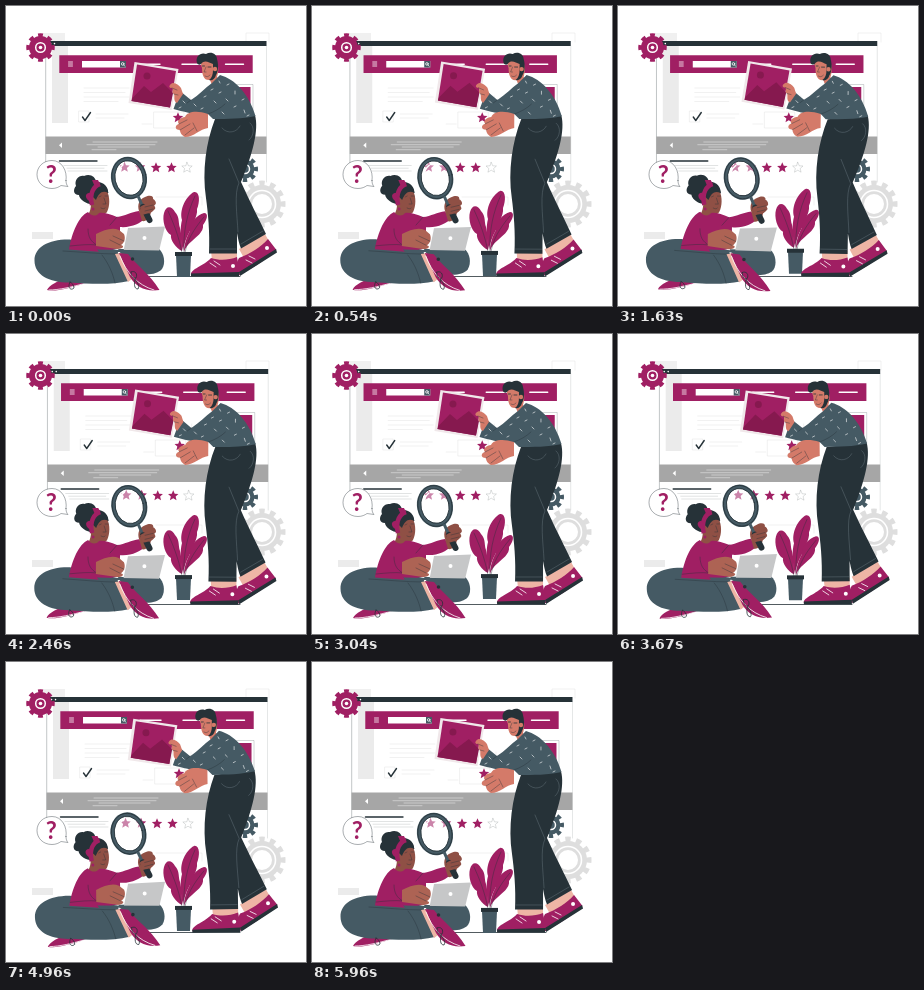
Write an HTML page that moves like this. It is 300x300 px and loops after 6000 ms.

```html
<!DOCTYPE html>
<html lang="en">
<head>
<meta charset="utf-8">
<title>Reviewing a page</title>
<style>
html, body { margin: 0; width: 100%; height: 100%; overflow: hidden; background: #fff }
svg { display: block; width: 100vw; height: 100vh }
.m { fill: #a01f63 } .d { fill: #263238 } .s { fill: #455a64 } .w { fill: #fff }
.g { fill: #ebebeb } .b { fill: #8f5045 } .lit { fill: #ad6354 } .k { fill: #d47a69 } .p { fill: #eeb5a5 }
.line { fill: none; stroke: #263238; stroke-width: .8; stroke-linecap: round; stroke-linejoin: round }
.thin { stroke-width: .4 }
.bold { stroke-width: 1.4 }
.white { stroke: #fff }
.pale { stroke: #dcdcdc }
</style>
</head>
<body>
<svg viewBox="0 0 300 300">
  <defs>
    <path id="star" d="M0-5.2 1.5-1.7 5.2-1.5 2.4 1 3.3 4.7 0 2.7-3.3 4.7-2.4 1-5.2-1.5-1.5-1.7Z"/>
  </defs>

  <!-- backdrop -->
  <g class="g">
    <path opacity=".75" d="M37 27H59V36H37Z"/>
    <path d="M26 226H47V233H26Z"/>
  </g>
  <path class="line thin pale" d="M240 35V27H263V36M150 191H196V199M222 226H248V233H222Z"/>

  <g id="page">
    <path class="w" d="M39.5 36H260.5V178H39.5Z"/>
    <path class="g" d="M46 40H62V117H46Z"/>
    <path class="line thin" d="M39.7 40V178" opacity=".7"/>
    <path class="line thin" d="M260.5 40V176" opacity=".3"/>
    <path class="d" d="M39.5 35H260.5V40H39.5Z"/>
    <g class="w"><circle cx="44.5" cy="37.6" r=".8"/><circle cx="48.5" cy="37.6" r=".8"/></g>
    <path class="m" d="M53.3 49.3H246.7V67H53.3Z"/>
    <path class="line white" d="M62.5 56H66.5M62.5 58H66.5M62.5 60H66.5"/>
    <path class="line bold white" d="M133 58.2H154M176 58.2H197M219.500 58.2H237.5"/>
    <path class="w" d="M76 55H120V61.5H76Z"/>
    <path class="s" d="M114 55H120V61.5H114Z"/>
    <circle class="line white" cx="116.7" cy="57.9" r="1.3"/>
    <path class="line white" d="M117.7 59 118.8 60.2"/>
    <path class="line thin pale" d="M78 82H123M78 86.5H119M78 91H123M78 95.5H112M90 108H122M90 112H118M73 105H83V116H73ZM148 106H178V122H148ZM184 90V122M136 118H146"/>
    <path class="line bold" d="M76.500 111 79 114.5 84.5 106.5"/>
    <path class="m" d="M229 81H244.5V108H229Z"/>
    <path class="line thin" d="M228 78.5H247V111" opacity=".5"/>

    <path fill="#a6a6a6" d="M39.500 130.5H260.500V148H39.5Z"/>
    <path class="w" d="M56 136.5V142L53 139.2Z"/>
    <path class="line thin white" d="M87 136H151M81 138.7H149M92 141H143M86 143.7H110"/>
    <path class="line bold" d="M53.5 155H91"/>
    <path class="line thin" opacity=".35" d="M58 159.5H101M61 162.2H98M62 165H101"/>
    <g class="m">
      <use href="#star" x="118.5" y="161"/><use href="#star" x="134" y="161"/>
      <use href="#star" x="150" y="161.5"/><use href="#star" x="165.5" y="161.5"/>
      <use href="#star" x="172" y="111.5"/>
    </g>
    <use href="#star" x="181" y="161.5" class="line thin" opacity=".4"/>
  </g>

  <!-- gears: dashed rings make the teeth -->
  <g fill="none">
    <circle cx="34.5" cy="41.5" r="11.5" stroke="#a01f63" stroke-width="5.5" pathLength="16" stroke-dasharray="1" stroke-dashoffset=".5"/>
    <circle class="m" cx="34.5" cy="41.5" r="11.5"/>
    <circle cx="34.5" cy="41.5" r="4.800" stroke="#fff" stroke-width="1.500"/>
    <circle class="w" cx="34.5" cy="41.5" r="1.8"/>
    <circle cx="256" cy="198" r="20.5" stroke="#dedede" stroke-width="6" pathLength="24" stroke-dasharray="1" stroke-dashoffset=".5"/>
    <circle cx="256" cy="198" r="14.5" stroke="#dedede" stroke-width="9"/>
    <circle cx="256" cy="198" r="13.5" stroke="#fff" stroke-width="1.6"/>
    <circle cx="239" cy="163" r="10.5" stroke="#455a64" stroke-width="5" pathLength="16" stroke-dasharray="1" stroke-dashoffset=".5"/>
    <circle class="s" cx="239" cy="163" r="9.5"/>
    <circle cx="239" cy="163" r="4.5" stroke="#fff" stroke-width="1.5"/>
  </g>

  <path class="line thin" style="fill:#fff" d="M60 174.5C61.5 165 56 154.5 46 154.5 37 154.5 31 161 31 168.5 31 176 37 182.5 46 182.5 50 182.5 53 181 55 179.5L62 180.5C60.5 179 60 177 60 174.5Z"/>
  <text class="m" x="45.3" y="177.3" text-anchor="middle" font-family="Lato, Inter, sans-serif" font-weight="700" font-size="24">?</text>
  <path class="line" d="M40 270.5H234"/>

  <g id="plant">
    <g class="m">
      <path d="M176 245C170 242 164 234 165 229 159 226 156 214 158 207 160 199 166 200 169 206 174 211 172 217 174 222 176 230 176 238 176 245Z"/>
      <path d="M177 245C174 232 174 222 176 214 173 204 180 190 188 186 194 185 194 196 191 203 192 211 185 219 184 225 180 232 178 238 177 245Z"/>
      <path d="M178 246C178 238 181 230 184 225 183 217 191 209 198 207 203 207 201 214 197 219 198 226 190 231 186 235 182 238 179 242 178 246Z"/>
    </g>
    <path class="line thin" d="M162 205C168 218 173 231 176 247M189 190C181 207 177 226 178 247M198 211C187 224 181 235 179 247"/>
    <path class="s" d="M170 249H185L184 271H171Z"/>
    <path class="d" d="M169 246H186V250H169Z"/>
  </g>

  <g id="woman">
    <path class="m" d="M62 271C52 275 43 279 41 284 48 286 62 283 86 275Z"/>
    <path class="line white" d="M43 284C53 284 66 281 80 277"/>
    <path class="s" d="M112 243H153C158 247 160 257 156 263 151 269 138 270 126 266Z"/>
    <path class="s" d="M64 233.5C43 233 28.5 241 28.5 254.5 28.5 269 43 276.5 63 276.5 86 278 106 279 123 275L111 244Z"/>
    <path class="line thin" d="M57 245C75 246 95 248 111 248M96 249C103 258 107 268 109 277"/>
    <path class="p" d="M109 248 115 247C119 255 124 264 126 273L122 276Z"/>
    <path class="m" d="M113 247 122 248C129 258 144 268 153.5 284 140 286 130 281 124 271Z"/>
    <path class="line white" d="M114 250C120 266 131 279 148 284"/>
    <circle class="d" cx="126.500" cy="253" r="1.8"/>
    <path class="line" d="M125 266C129 264 132 268 130 272 127 273 125 270 125 266M129 273C128 278 128 283 132 283 134 280 131 276 129 273M64 276C61 282 65 285 68 282 68 279 66 277 64 276"/>

    <path class="d" d="M84 198C78 197 73 192 73 189 67 189 67 183 70 180 68 174 73 169 78 170 84 167 90 171 90 176 97 175 103 181 102 187Z"/>
    <path class="b" d="M85 195C88 187 93 181 101 185 104 191 104 200 101 206 99 209 95 208 93 207L94 211C90 214 84 212 82 209 85 204 85 200 85 195Z"/>
    <path class="d" d="M86 190C88 176 100 175 102.500 187 96 184 93 187 90 194Z"/>
    <path fill="none" stroke="#a01f63" stroke-width="4.5" d="M94 178C88 180 83 187 86 199"/>
    <path class="m" d="M89 181 86 174 92 174 94 178ZM84 187C77 187 80 195 86 196Z"/>
    <path class="line thin" d="M93 191 95 190M99 190 102 190M98 192 100 198 97 198M95 202C97 203 98 203 99 202"/>
    <circle class="m" cx="87" cy="203" r="1.5"/>

    <path class="m" d="M82 206C73 210 66 226 63 243.5L96 246 114 242 114 221C125 222 135 217 138 213L133 205C125 206 119 210 111 211 104 208 97 206 93 207 90 211 85 210 82 206Z"/>
    <path class="line thin" d="M111 211 104 219M82 223C82 231 85 236 91 239M64 240C74 239 83 238 91 239"/>
    <path class="lit" d="M90 228C98 224 106 221 113 224L118 228C120 233 118 237 115 239 119 240 117 243 111 243L90 240Z"/>
    <path class="line thin" d="M104 234 114 239M107 230 118 235"/>
    <path fill="#c6c7c8" d="M122 222 159 220.5 153 245H117.5Z"/>
    <path fill="#455a64" d="M91 243.5 153 244.5V246H93Z"/>
    <circle class="w" cx="138.5" cy="232" r="2"/>

    <g fill="none">
      <ellipse cx="123" cy="172" rx="15.800" ry="19.300" fill="#fff" fill-opacity=".45" stroke="#455a64" stroke-width="4.200" transform="rotate(-12 123 172)"/>
      <ellipse cx="123" cy="172" rx="17" ry="20.5" class="line" transform="rotate(-12 123 172)"/>
      <ellipse cx="123" cy="172" rx="14" ry="17.5" class="line" transform="rotate(-12 123 172)"/>
    </g>
    <path class="line bold white" d="M112 175C110 168 113 162 117 159M129 185 134 178"/>
    <path class="b" d="M133 205C131 199 133 193 139 191 145 188 148 191 147 193 150 194 150 198 148 199 150 202 148 205 145 206 144 212 140 216 136 215Z"/>
    <path fill="none" stroke="#455a64" stroke-width="3" d="M132 190 136 199"/>
    <path fill="none" stroke="#263238" stroke-width="6" stroke-linecap="round" d="M137 201 143.5 214"/>
    <path class="b" d="M134 201C138 198 145 197 149 195 151 198 149 199 147 200 151 201 149 204 147 204 146 208 141 207 136 209Z"/>
    <path class="line thin" d="M139 201 147 199M139 205 147 203"/>
  </g>

  <g id="man">
    <path class="p" d="M205 244H231V255H206ZM233 243 259 228 264 237 238 252Z"/>
    <path class="m" d="M205 252C214 255 223 254 231 251L234 269H185C184 263 198 260 205 252Z"/>
    <path class="m" d="M233 252C244 248 255 241 262 233L270.5 244C261 252 250 261 234 268 229 264 230 257 233 252Z"/>
    <path class="d" d="M185 267.5 233 266V270.5H185ZM233 266 270 243 271 246.5 234 270Z"/>
    <path class="line white" d="M204 257 210 261M208 255 214 259M240 254 246 257M243 250 249 253"/>
    <circle class="w" cx="227" cy="260" r="2"/><circle class="w" cx="261" cy="242" r="2"/>

    <path class="d" d="M209 113 249 109C253 124 247 147 235 176 244 196 253 213 260 228L235 242.5C233 238 232 232 231 227L231 247.5H203C204 226 202 207 200 192 196 165 200 136 209 113Z"/>
    <path class="line thin" style="stroke:#71818a" d="M216 122C222 129 231 126 234 120M244 117C249 121 248 130 243 134M223 153 233 177C228 187 231 208 232 226M204 243H230M235 238 257 225"/>

    <path class="k" d="M196 62C194 57 195 53 199 51L209 54C213 58 213 65 211 71L214 75 206 79 204 74C198 75 196 69 196 62Z"/>
    <path class="d" d="M191 57C189 50 195 46 200 48 205 45 211 48 211 53 213 60 212 66 210 69 209 73 206 75 203 74 206 72 207 68 207 64L207 58C203 57 199 53 195 58 194 59 192 59 191 57Z"/>
    <circle class="k" cx="209" cy="63" r="2.2"/>
    <path class="line" d="M196.500 60 198.500 60M202 61 205 61"/>
    <path class="line thin" d="M200 61 198 66 200 66M199 70C201 71 202 71 204 69"/>

    <path class="s" d="M206 77 214 69C229 73 243 88 249.500 110 236 113 221 113 207 113L202 108C193 110 179 106 167.5 103L174 85 185 94C193 89 199 82 206 77Z"/>
    <path class="line thin" d="M202 108C208 106 215 102 219 98M185 94 181 97"/>
    <path class="line white" opacity=".75" d="M213 75 214 77M221 79 223 78M229 85 229 88M213 87 215 86M220 93 222 95M236 94 238 93M208 95 210 97M198 91 200 90M188 98 190 100M195 103 197 102M177 95 179 97M228 101 230 100M238 104 239 107M216 106 218 108M173 102 175 101M205 84 207 83M241 110 243 109"/>

    <path class="k" d="M202 122C194 123 188 131 179 131 175 129 174 126 174 124 168 124 169 119 173 118 170 115 175 111 179 111 181 106 190 104 202 108Z"/>
    <path class="line thin" d="M174 124 184 118M179 129 188 122M173 118 181 114M191 125 187 117"/>

    <path fill="#f0e8ea" d="M128.500 56 172.500 63 165.500 104 122.500 97Z"/>
    <path class="m" d="M131 58.5 170 65 164 101.5 125.5 95Z"/>
    <path fill="#86194f" d="M126.5 92 138 80 145 86 157 77 167 87 164 101.5 125.5 95Z"/>
    <circle cx="141" cy="70" r="3.5" fill="#86194f"/>
    <path class="k" d="M164 79C167 75 172 78 175 82L177 88 171 97C167 95 169 91 168 88 165 87 168 84 166 82 163 82 163 80 164 79Z"/>
    <path class="line thin" d="M166 82 171 84M168 88 172 89"/>
  </g>
</svg>
<script>
const LOOP = 6000;
const SWAY = { woman: '94 219', man: '197 158' };
// horizontal shake: one stop for every tenth of the loop
const STOPS = [0, -1, 1, -1, 1, -1, 1, -1, .8, -.8, 0];
const el = id => document.getElementById(id);
const move = (id, value) => el(id).setAttribute('transform', value);
const ease = p => p < .5 ? 2 * p * p : 1 - 2 * (1 - p) ** 2;

function shake(u) {
  const i = Math.floor(u * 10);
  return 1.8 * (STOPS[i] + (STOPS[i + 1] - STOPS[i]) * ease(u * 10 - i));
}

function draw() {
  const u = performance.now() % LOOP / LOOP;
  const angle = Math.asin(Math.sin(2 * Math.PI * u)) * 2 / Math.PI;
  const lift = 6 * (1 - Math.abs(2 * u - 1));
  move('page', `translate(${shake(u)})`);
  move('plant', `translate(0 ${-lift})`);
  for (const id in SWAY) move(id, `rotate(${angle} ${SWAY[id]})`);
  requestAnimationFrame(draw);
}
draw();
</script>
</body>
</html>
```
